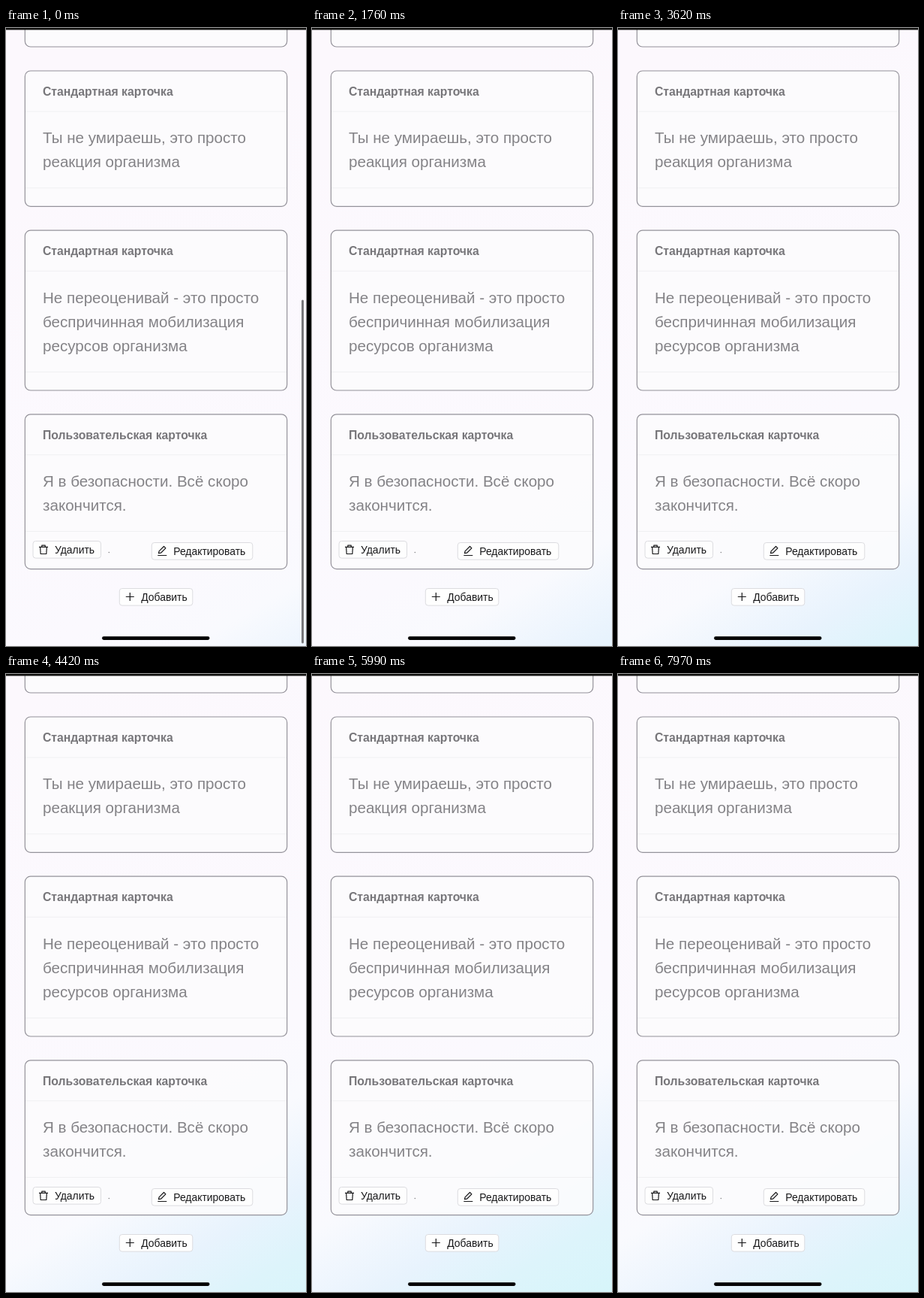
Animation, 400 px wide and 822 px high, one loop 7990 ms. Source, as an HTML page:

```html
<!DOCTYPE html>
<html lang="ru">
<head>
<meta charset="utf-8">
<style>
  html, body { margin: 0; width: 100%; height: 100%; overflow: hidden; background: #fbf9fe; }
  svg { display: block; width: 400px; height: 822px; font-family: "Liberation Sans", Arial, sans-serif; }
  .card { fill: #fcfcfd; fill-opacity: .9; stroke: #94929a; stroke-width: 1.2; }
  .divider { stroke: #f0f0f2; }
  .title { font-size: 15.75px; font-weight: bold; fill: #77767a; }
  .body { font-size: 20.6px; fill: #848387; }
  .button { fill: #fefefe; stroke: #dcdce0; }
  .label { font-size: 13.9px; fill: #18181a; }
  .icon { fill: none; stroke: #18181a; stroke-width: 1.2; stroke-linejoin: round; }
</style>
</head>
<body>
<svg viewBox="0 0 400 822">
  <defs>
    <!-- 900 px long, running from the bottom right corner up and to the left -->
    <linearGradient id="glow" gradientUnits="userSpaceOnUse" x1="400" y1="822" x2="-50" y2="39">
      <stop offset="0" stop-color="#d6f5fa"/>
      <stop offset=".1" stop-color="#ddf4fb"/>
      <stop offset=".18" stop-color="#e8f3fd"/>
      <stop offset=".3" stop-color="#f9fafe"/>
      <stop offset=".4" stop-color="#fbf9fe"/>
      <stop offset="1" stop-color="#fcf8fd"/>
    </linearGradient>
  </defs>
  <rect width="400" height="822" fill="url(#glow)"/>
  <g id="content"></g>
  <rect width="400" height="2.5" fill="#121210"/>
  <rect x="128" y="809.3" width="143.5" height="4.6" rx="2.3" fill="#050505"/>
  <rect id="scrollbar" x="394" y="361.5" width="3" height="457" rx="1.5" fill="#77777a"/>
</svg>
<script>
const DURATION = 7990;
const byId = id => document.getElementById(id);

const text = (cls, x, y, value) => `<text class="${cls}" x="${x}" y="${y}">${value}</text>`;
const box = (cls, x, y, w, h, r) =>
  `<rect class="${cls}" x="${x}" y="${y}" width="${w}" height="${h}" rx="${r}"/>`;

const card = (top, height, title, rows, footer = 24.5) =>
  box('card', 25.3, top, 349.4, height, 7.5) +
  [top + 54, top + height - footer].map(y => `<path class="divider" d="M26 ${y}H374"/>`).join('') +
  text('title', 49, top + 32.7, title) +
  rows.map((row, i) => text('body', 49, top + 96.4 + i * 32, row)).join('');

const button = (x, y, width, label, icon) =>
  box('button', x, y, width, 22.6, 3.5) +
  `<path class="icon" transform="translate(${x + 8} ${y + 5})" d="${icon}"/>` +
  text('label', x + 29, y + 16.2, label);

const TRASH = 'M0 2.8H12M3.8 2.8V.6H8.2V2.8M1.6 2.8L2.2 12H9.8L10.4 2.8';
const PENCIL = 'M0 12H12M1.2 9.2L1.8 6.4L8.2 0L10.6 2.4L4.2 8.7Z';
const PLUS = 'M6 .5V11.5M.5 6H11.5';

byId('content').innerHTML =
  box('card', 25.3, -40, 349.4, 65, 7.5) +
  card(57, 180.3, 'Стандартная карточка', ['Ты не умираешь, это просто', 'реакция организма']) +
  card(269.2, 212.8, 'Стандартная карточка',
    ['Не переоценивай - это просто', 'беспричинная мобилизация', 'ресурсов организма']) +
  card(513.8, 205.8, 'Пользовательская карточка', ['Я в безопасности. Всё скоро', 'закончится.'], 50.1) +
  button(36, 682.5, 90.5, 'Удалить', TRASH) +
  button(194.3, 684.5, 134.5, 'Редактировать', PENCIL) +
  button(151.3, 745.5, 97.5, 'Добавить', PLUS) +
  '<circle cx="137.3" cy="697.5" r=".7" fill="#77777a"/>';

// The background drifts back and forth; the glow reaches furthest at PEAK.
const PEAK = 6650, PERIOD = 15000;

function draw(time) {
  const shift = 100 * (1 - Math.cos(2 * Math.PI * (time - PEAK) / PERIOD));
  byId('glow').setAttribute('gradientTransform', `translate(${shift * .5} ${shift * .87})`);
  byId('scrollbar').style.opacity = Math.max(0, Math.min(1, (500 - time) / 400));
}

const start = performance.now();
function tick() {
  draw((performance.now() - start) % DURATION);
  requestAnimationFrame(tick);
}
tick();
</script>
</body>
</html>
```
